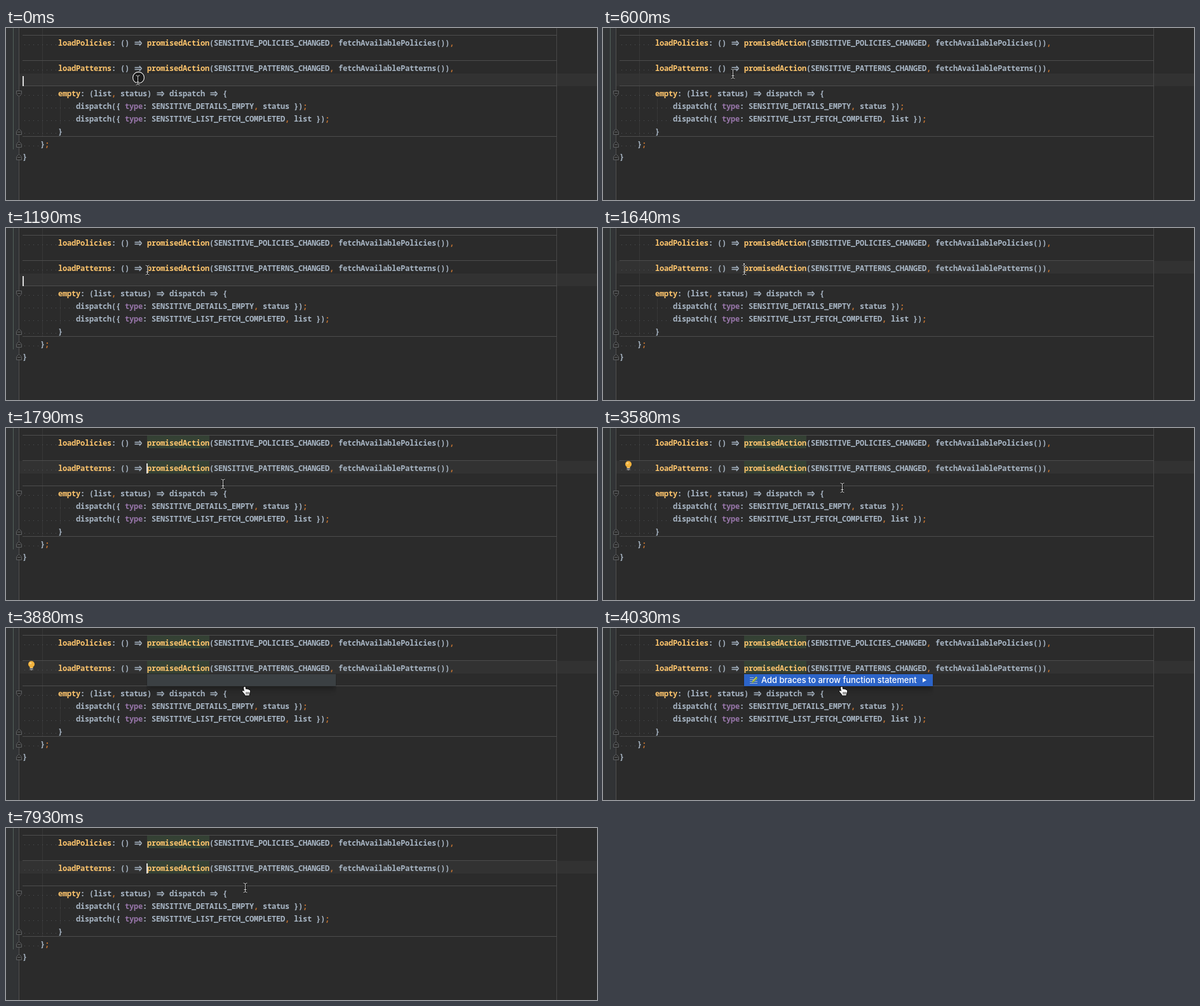
An HTML page with a canvas for the animation above (8 s loop, 930 by 272 pixels).

```html
<!DOCTYPE html>
<html lang="en">
<head>
<meta charset="utf-8">
<title>Editor intention</title>
<style>
  html, body { margin: 0; width: 930px; height: 272px; overflow: hidden; background: #2b2b2b; }
  canvas { display: block; }
</style>
</head>
<body>
<canvas id="stage" width="930" height="272"></canvas>
<script>
const ctx = document.getElementById('stage').getContext('2d');
const LOOP = 8000, LEFT = 26, CELL = 7, ROW = 20;
const CODE_FONT = '600 12px "Noto Sans Mono", "DejaVu Sans Mono", monospace';
const MENU_FONT = '500 12.9px Inter, "Liberation Sans", sans-serif';
const C = {
  back: '#2b2b2b', gutter: '#313335', row: '#323232', rule: '#4d4d4d', guide: '#373737',
  dot: '#505356', text: '#a9b7c6', name: '#ffc66d', key: '#9876aa', mark: '#cc7832',
  usage: '#344134', caret: '#dcdcdc', fold: '#606264', menu: '#3b4043', pick: '#2c64c9'
};

// top of the row, indent in columns, code
const LINES = [
  [12, 8, 'loadPolicies: () => promisedAction(SENSITIVE_POLICIES_CHANGED, fetchAvailablePolicies()),'],
  [52, 8, 'loadPatterns: () => promisedAction(SENSITIVE_PATTERNS_CHANGED, fetchAvailablePatterns()),'],
  [92, 8, 'empty: (list, status) => dispatch => {'],
  [112, 12, 'dispatch({ type: SENSITIVE_DETAILS_EMPTY, status });'],
  [132, 12, 'dispatch({ type: SENSITIVE_LIST_FETCH_COMPLETED, list });'],
  [152, 8, '}'],
  [172, 4, '};'],
  [192, 0, '}']
];

// start time, x, y of the pointer centre
const POINTER = [
  [0, 207.5, 82.5], [300, 206.5, 82.5], [450, 197.5, 77.5], [600, 204.5, 72.5],
  [750, 221.5, 67.5], [1190, 222.5, 66.5], [1790, 341.5, 88.5], [1940, 376.5, 94.5]
];
const CARET_OFF = [[600, 1050], [2540, 2990], [3580, 7930]];

const during = (t, from, to) => t >= from && t < to;

function rect(x, y, w, h, color) {
  ctx.fillStyle = color;
  ctx.fillRect(x, y, w, h);
}

function trace(points, closed) {
  ctx.beginPath();
  points.forEach(([x, y]) => ctx.lineTo(x, y));
  if (closed) ctx.closePath();
}

function stroke(color, width) {
  ctx.strokeStyle = color;
  ctx.lineWidth = width;
  ctx.stroke();
}

function fill(color) {
  ctx.fillStyle = color;
  ctx.fill();
}

function tokenColor(token) {
  if (/^[,;]$/.test(token)) return C.mark;
  if (token === 'type') return C.key;
  return /^(load\w+|promisedAction|empty)$/.test(token) ? C.name : C.text;
}

function arrow(x, y) {
  ctx.beginPath();
  for (const side of [-1, 1]) {
    ctx.moveTo(x + 1.5, y + side * 1.5);
    ctx.lineTo(x + 11, y + side * 1.5);
    ctx.moveTo(x + 8.8, y + side * 4);
    ctx.lineTo(x + 12.6, y);
  }
  stroke(C.text, 1.3);
}

function codeLine([top, indent, code]) {
  for (let i = 0; i < indent; i++) rect(LEFT + i * CELL + 3, top + 14, 1, 1, C.dot);
  ctx.font = CODE_FONT;
  ctx.textAlign = 'center';
  for (const { 0: token, index } of code.matchAll(/\w+|=>|[^\w\s]/g)) {
    const x = LEFT + (indent + index) * CELL;
    if (token === '=>') {
      arrow(x, top + 12);
    } else {
      ctx.fillStyle = tokenColor(token);
      [...token].forEach((char, i) => ctx.fillText(char, x + (i + 0.5) * CELL, top + 16));
    }
  }
}

function foldMark(y, dir) {
  trace([[16.5, y - 4 * dir], [24.5, y - 4 * dir], [24.5, y + dir], [20.5, y + 5 * dir], [16.5, y + dir]], true);
  fill(C.back);
  stroke(C.fold, 1);
  rect(18, y - 0.5, 5, 1, C.fold);
}

function bulb() {
  ctx.beginPath();
  ctx.arc(40, 57.2, 5, 0, Math.PI * 2);
  fill('#f3b33d');
  rect(37.5, 60, 5, 3, '#f3b33d');
  ctx.beginPath();
  ctx.arc(38.6, 55.7, 1.8, 0, Math.PI * 2);
  fill('#f8cf7c');
  rect(37.5, 63, 5, 1, '#c9c9c9');
  rect(37.5, 65, 5, 1, '#a5a5a5');
  rect(38.5, 66, 3, 1, '#8b8b8b');
}

function menuIcon() {
  [[78, 6], [81, 11], [84, 12], [87, 12]].forEach(([y, w]) => rect(231, y, w, 1, '#aab4bf'));
  trace([[234, 87], [235, 83.5], [241, 76.5], [243.5, 79], [237.5, 85.5]], true);
  fill('#7fa83f');
  trace([[235.5, 84], [241.7, 77.3]]);
  stroke('#d9c85f', 1.2);
}

function menu(ready) {
  ctx.save();
  ctx.shadowColor = 'rgba(0,0,0,.3)';
  ctx.shadowBlur = 10;
  ctx.shadowOffsetY = 5;
  ctx.beginPath();
  ctx.rect(221, 72, 299, 36);
  ctx.clip();
  rect(222, 73, 297, 19, C.menu);
  ctx.restore();
  if (!ready) return;
  rect(222, 73, 297, 19, C.pick);
  menuIcon();
  ctx.font = MENU_FONT;
  ctx.textAlign = 'left';
  ctx.fillStyle = '#fff';
  ctx.fillText('Add braces to arrow function statement', 249, 87);
  trace([[503, 79], [509, 82.5], [503, 86]], true);
  fill('#fff');
}

function clickRing(x, y) {
  ctx.beginPath();
  ctx.arc(x, y, 9, 0, Math.PI * 2);
  fill('rgba(0,0,0,.45)');
  stroke('#111', 2.6);
  stroke('#e6e6e6', 1.3);
}

function beam(x, y) {
  ctx.beginPath();
  for (const side of [-1, 1]) {
    ctx.moveTo(x - 3, y + side * 7.5);
    ctx.quadraticCurveTo(x, y + side * 7.5, x, y + side * 5.5);
    ctx.quadraticCurveTo(x, y + side * 7.5, x + 3, y + side * 7.5);
  }
  ctx.moveTo(x, y - 6);
  ctx.lineTo(x, y + 6);
  ctx.moveTo(x - 2, y + 3);
  ctx.lineTo(x + 2, y + 3);
  stroke('#111', 2.4);
  stroke('#e8e8e8', 0.9);
}

function hand(x, y) {
  ctx.save();
  ctx.translate(x, y);
  trace([[4, 1], [5.5, 1], [6.3, 5], [8, 4.6], [9, 5.3], [10.3, 5], [11.3, 6], [12.6, 6.2],
    [13.3, 8], [12.4, 11], [11.6, 14.5], [5.4, 14.5], [4.6, 12.4], [1, 8.6], [1.4, 7.2],
    [2.8, 7.3], [4.2, 8.6], [3, 2.2]], true);
  ctx.lineJoin = 'round';
  stroke('#111', 2);
  fill('#fff');
  for (const fx of [7, 9, 11]) rect(fx - 0.5, 9, 0.9, 4, '#222');
  ctx.restore();
}

function page(t) {
  const moved = t >= 1490;
  rect(0, 0, 930, 272, C.back);
  rect(0, 0, 20, 272, C.gutter);
  rect(11, 0, 1, 192, '#53605a');
  rect(20, 0, 1, 272, '#505050');
  rect(21, moved ? 52 : 72, 909, ROW, C.row);
  rect(57, 0, 1, 172, C.guide);
  rect(85, 112, 1, 40, C.guide);
  rect(866, 0, 1, 272, '#474747');
  for (const y of [11, 51, 91, 171]) rect(LEFT, y, 841, 1, C.rule);
  if (t >= 1790) for (const y of [12, 52]) rect(222, y, 98, ROW, C.usage);
  LINES.forEach(codeLine);
  foldMark(103.5, 1);
  for (const y of [164.5, 184.5, 204.5]) foldMark(y, -1);
  if (!CARET_OFF.some(([from, to]) => during(t, from, to))) {
    rect(moved ? 221 : 26, moved ? 56 : 76, 2, 16, C.caret);
  }
}

function draw(t) {
  page(t);
  if (during(t, 2390, 4030)) bulb();
  const menuOpen = during(t, 3880, 7930);
  if (menuOpen) menu(t >= 4030);
  const [, x, y] = POINTER.filter(([start]) => t >= start).pop();
  if (t < 150 || during(t, 1490, 1640)) clickRing(x + 1, y - 4);
  if (menuOpen) hand(371, 92);
  else beam(x, y);
}

function tick() {
  draw(performance.now() % LOOP);
  requestAnimationFrame(tick);
}
tick();
</script>
</body>
</html>
```
